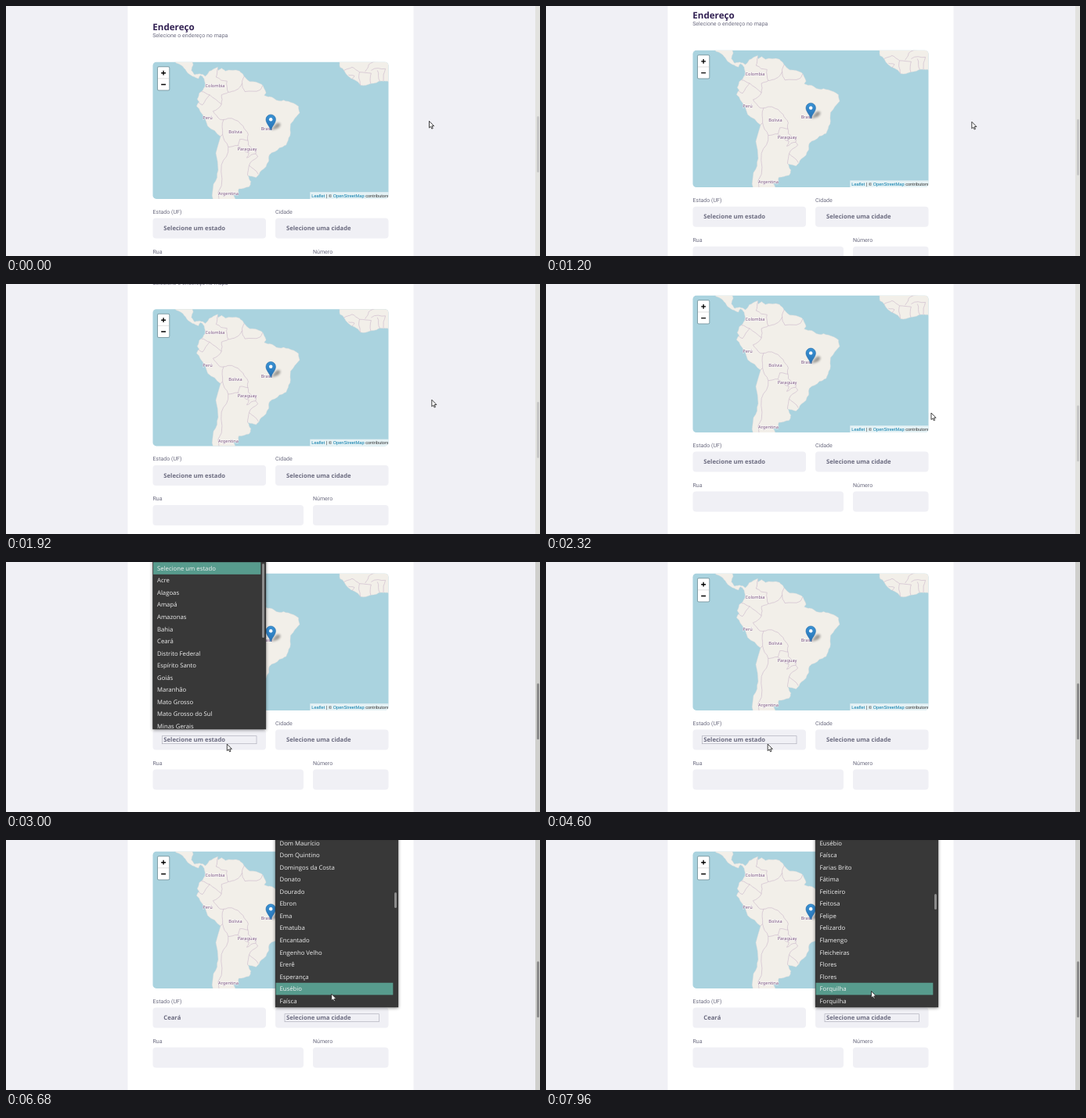
An HTML page that plays this animation: 682x320 px, repeating every 8 s.

```html
<!DOCTYPE html>
<html lang="pt-BR">
<head>
<meta charset="utf-8">
<title>Endereço</title>
<style>
  html, body { margin: 0; width: 100%; height: 100%; overflow: hidden; background: #f0f0f5; }
  svg { display: block; width: 682px; height: 320px; }
  text { white-space: pre; text-rendering: geometricPrecision; }
  .label { font: 7.05px Roboto, sans-serif; fill: #6c6c80; }
  .title { font: 700 11.6px "Open Sans", sans-serif; fill: #322153; }
  .value { font: 700 7.68px "Open Sans", sans-serif; fill: #6c6c80; }
  .field { fill: #f0f0f5; }
  .focus { fill: none; stroke: #a9a9b5; stroke-width: .6; }
  .land { fill: #f2efe9; stroke: #dcd8da; stroke-width: .4; stroke-linejoin: round; }
  .border { fill: none; stroke: #c9b6ca; stroke-width: .6; stroke-linejoin: round; }
  .place { font: 5.6px "Noto Sans", sans-serif; fill: #79527f; text-anchor: middle;
           paint-order: stroke; stroke: #fff; stroke-opacity: .7; stroke-width: 1.2px; }
  .credit { font: 5.66px "Liberation Sans", Arial, sans-serif; fill: #333; }
  .credit .link { fill: #0078a8; }
  .menu text { font: 7.75px "Open Sans", sans-serif; fill: #f0f0f0; }
  .menu .panel { fill: #383838; stroke: #292929; stroke-width: .8; }
  .menu .hit { fill: #579b8d; }
  .menu .thumb { fill: #8c8c8c; }
</style>
</head>
<body>
<svg viewBox="0 0 682 320" xmlns="http://www.w3.org/2000/svg">
  <defs>
    <clipPath id="mapClip"><rect x="187.5" y="71.7" width="301" height="175.2" rx="4.5"/></clipPath>
    <filter id="blur" x="-50%" y="-50%" width="200%" height="200%"><feGaussianBlur stdDeviation="1.4"/></filter>
    <filter id="shade" x="-10%" y="-10%" width="120%" height="120%"><feGaussianBlur stdDeviation="2"/></filter>
    <linearGradient id="pin" x1="0" y1="0" x2="0" y2="1">
      <stop offset="0" stop-color="#3a92d4"/><stop offset="1" stop-color="#2672b5"/>
    </linearGradient>
  </defs>

  <rect width="682" height="320" fill="#f0f0f5"/>
  <rect x="155.5" width="365" height="320" fill="#fff"/>

  <g id="page">
    <text class="title" x="187.3" y="31">Endereço</text>
    <text class="label" x="187.2" y="40">Selecione o endereço no mapa</text>

    <g clip-path="url(#mapClip)">
      <rect x="187" y="71" width="302" height="177" fill="#aad3df"/>
      <g id="map"></g>

      <path d="M338.5 159l6-8q4-3 6 0q0 4-5 6z" opacity=".36" filter="url(#blur)"/>
      <path d="M338.2 159C336.5 153.5 332 150 332 145.2a6.2 6.2 0 0 1 12.4 0C344.4 150 339.9 153.5 338.2 159Z" fill="url(#pin)" stroke="#2468a3" stroke-width=".6"/>
      <circle cx="338.2" cy="145.3" r="2.2" fill="#fff"/>

      <rect x="193" y="77.2" width="16.3" height="31.2" rx="2.2" opacity=".25"/>
      <rect x="194" y="78.2" width="14.3" height="29.2" rx="1.2" fill="#fff"/>
      <path d="M194 92.8h14.3" stroke="#ccc" stroke-width=".6"/>
      <path d="M198.2 85.7h5.8M201.1 82.8v5.8M198.2 100.5h5.8" stroke="#000" stroke-width="1.35"/>

      <rect x="388.3" y="238.2" width="101" height="9" fill="#fff" opacity=".7"/>
      <text class="credit" x="390.3" y="244.5"><tspan class="link">Leaflet</tspan> | © <tspan class="link">OpenStreetMap</tspan> contributors</text>
    </g>

    <g id="fields"></g>
    <text class="value" id="stateValue" x="201.3" y="287.3"></text>
    <text class="value" x="358" y="287.3">Selecione uma cidade</text>
    <rect class="focus" id="focus" y="279.7" width="120.5" height="10"/>
  </g>

  <rect id="track" x="676" width="6" height="320"/>
  <rect id="bar" x="678" width="3" height="72" rx="1.5"/>

  <g class="menu" id="stateMenu"></g>
  <g class="menu" id="cityMenu"></g>

  <path id="cursor" d="M0 0V8.6L2 6.9 3.3 9.8 4.7 9.2 3.4 6.3H6.1Z" fill="#fff" stroke="#222" stroke-width=".85" stroke-linejoin="round"/>
</svg>

<script>
const LOOP = 8000, STEP = 40, ROW = 15.55, MENU_H = 214, NOTCH = 28.5;
const $ = id => document.getElementById(id);

function add(parent, tag, attrs, text) {
  const el = document.createElementNS('http://www.w3.org/2000/svg', tag);
  for (const k in attrs) el.setAttribute(k, attrs[k]);
  if (text) el.textContent = text;
  return parent.appendChild(el);
}

const place = (el, x, y) => el.setAttribute('transform', `translate(${x} ${y})`);
const show = (el, on) => el.setAttribute('visibility', on ? 'visible' : 'hidden');
const phase = (t, from, length) => Math.min(1, Math.max(0, (t - from) / length));
const easeOut = k => 1 - (1 - k) ** 2;
const easeInOut = k => k * k * (3 - 2 * k);
const lastOf = (steps, t) => steps.filter(s => s[0] <= t).pop()[1];

// Web Mercator, centred on the pin in Brasília.
const DEG = 256 * 8 / 360 / 2, HOME = [-47.93, -15.78];
const mercator = lat => Math.asinh(Math.tan(lat * Math.PI / 180)) * 180 / Math.PI;
const project = ([lon, lat]) =>
  [338 + (lon - HOME[0]) * DEG, 159.3 - (mercator(lat) - mercator(HOME[1])) * DEG];

let seed = 11;
const random = () => (seed = seed * 16807 % 2147483647) / 2147483647;

// Midpoint displacement turns a few key points into a natural line.
function roughen(points, depth) {
  if (!depth) return points;
  const out = [points[0]];
  for (let i = 1; i < points.length; i++) {
    const [ax, ay] = points[i - 1], [bx, by] = points[i];
    const k = (random() - .5) * .22;
    out.push([(ax + bx) / 2 + (ay - by) * k, (ay + by) / 2 + (bx - ax) * k], points[i]);
  }
  return roughen(out, depth - 1);
}

function outline(cls, coords, closed) {
  const points = coords.split(',').map(p => project(p.trim().split(' ').map(Number)));
  const d = 'M' + roughen(points, 2).map(p => p.map(v => v.toFixed(1)).join(' ')).join('L');
  add($('map'), 'path', { class: cls, d: d + (closed ? 'Z' : '') });
}

// Key points are "longitude latitude".
outline('land', `-83 16,-83.5 11,-82 9,-79.8 9.5,-77.3 8.4,-75.5 10.6,-71.7 12.4,-71.5 10.9,-70 12,-68.3 10.7,
  -61.9 10.7,-60 8.5,-57.3 6,-52 4.8,-50 1,-50.8 -.2,-48.4 -.8,-44.3 -2.6,-40 -2.9,-35.4 -5.2,-34.9 -8,
  -39 -13,-39.2 -18,-41 -22,-44 -23.1,-48.5 -26,-48.8 -28.6,-52.2 -32.2,-54.5 -34.8,-58.2 -34,-56.8 -36.3,
  -57.7 -38.2,-62.2 -38.9,-62.3 -40.6,-65 -41,-63.7 -42.5,-65.3 -45,-74 -45,-73.6 -37.2,-71.5 -32,-70.4 -18.4,
  -76.2 -13.9,-79.5 -7.5,-81.2 -5,-80 -3,-80.9 -1.8,-80 .8,-77.4 3.8,-77.8 7.3,-79.5 8.8,-80.4 7.3,-83 8.4,
  -85.7 10.5,-88 13.2,-92 16`, true);
outline('land', '-17.5 16,-16.8 12.4,-13.3 8.6,-7.6 4.4,-3 5.1,2 6.3,4.5 6.3,7 4.3,7 16', true);

[
  '-71.5 12,-72.4 8,-67.5 6.2,-67 1.2,-70 0,-70 -4.2,-75.3 0,-79 1.5',
  '-75.3 0,-78.5 -4.5,-80.3 -3.4',
  '-70 -4.2,-73.8 -7.3,-70.6 -11,-69 -11,-69.5 -17.5,-70.4 -18.4',
  '-69 -11,-65.3 -10.5,-60.3 -13.8,-58 -17.5,-58 -22,-54.3 -24,-54.6 -25.6,-58.6 -27.2,-57.7 -25.2,-62.7 -22.2',
  '-58 -20,-61.8 -19.6,-62.7 -22.2,-67 -22.8,-69.5 -17.5',
  '-54.6 -25.6,-53.7 -26.8,-57.6 -30.2,-53.5 -33.6',
  '-57.6 -30.2,-58.3 -34',
  '-67 -22.8,-70 -30,-71.5 -40,-71.8 -45',
  '-67 1.2,-63.5 2.2,-60.7 5.2,-59.8 8.3',
  '-60.7 5.2,-59.5 1.5,-52.6 2.3,-51.6 4.2',
  '-15 11,-11.4 12.4,-8 10.2,-8.3 7.6,-7.6 4.4',
  '-13 9,-10.3 8.5,-11.4 7',
  '-8 10.2,-2.8 9.7,-3 5.1',
  '-5.5 10.4,-4 13.4,0 15',
  '-2.8 11,3.6 11.7,2.7 6.3',
  '0 11,1.2 6.1',
].forEach(line => outline('border', line));

for (const [name, x, y] of [['Colombia', 267, 103.5], ['Perú', 257.5, 145], ['Bolivia', 293, 163],
  ['Brasil', 333, 159.3], ['Paraguay', 308, 184.8], ['Argentina', 284, 242]])
  add($('map'), 'text', { class: 'place', x, y }, name);

for (const [name, x, y, width] of [['Estado (UF)', 187.5, 265.5, 144.5], ['Cidade', 344, 265.5, 144.5],
  ['Rua', 187.5, 316.5, 192.5], ['Número', 392, 316.5, 96.5]]) {
  add($('fields'), 'text', { class: 'label', x, y }, name);
  add($('fields'), 'rect', { class: 'field', x, y: y + 6, width, height: 26, rx: 4 });
}

function menu(id, x, width, thumbH, names) {
  const root = $(id), clip = id + 'Clip';
  add(add(root, 'clipPath', { id: clip }), 'rect', { x, y: 0, width, height: MENU_H - .5 });
  add(root, 'rect', { x, y: -8, width, height: MENU_H + 9, opacity: .45, filter: 'url(#shade)' });
  add(root, 'rect', { class: 'panel', x: x + .3, y: -.2, width: width - .6, height: MENU_H });
  const list = add(add(root, 'g', { 'clip-path': `url(#${clip})` }), 'g', {});
  const hit = add(list, 'rect', { class: 'hit', x: x + .6, width: width - 7.3, height: ROW });
  names.forEach((name, i) => add(list, 'text', { x: x + 5.5, y: i * ROW + 10.8 }, name));
  const thumb = add(root, 'rect', { class: 'thumb', x: x + width - 5, width: 3, height: thumbH, rx: 1.5 });
  return (open, row, scroll, thumbY) => {
    show(root, open);
    show(hit, open && row >= 0);
    hit.setAttribute('y', row * ROW + .3);
    thumb.setAttribute('y', thumbY);
    place(list, 0, -scroll);
  };
}

const stateMenu = menu('stateMenu', 187.5, 144.5, 95, ['Selecione um estado', 'Acre', 'Alagoas', 'Amapá',
  'Amazonas', 'Bahia', 'Ceará', 'Distrito Federal', 'Espírito Santo', 'Goiás', 'Maranhão', 'Mato Grosso',
  'Mato Grosso do Sul', 'Minas Gerais']);

// Only the stretches of the long list that come into view.
const cities = ['Selecione uma cidade', 'Abaiara', 'Abílio Martins', 'Acarape',
  'Acaraú', 'Acopiara', 'Açude dos Pinheiros', 'Açudinho', 'Açudinho dos Costas', 'Adrianópolis', 'Água Branca',
  'Agua Fria', 'Água Verde', 'Aguaí',
  'Dom Maurício', 'Dom Quintino', 'Domingos da Costa', 'Donato', 'Dourado', 'Ebron', 'Ema', 'Ematuba',
  'Encantado', 'Engenho Velho', 'Ererê', 'Esperança', 'Eusébio', 'Faísca', 'Farias Brito', 'Fátima',
  'Feiticeiro', 'Feitosa', 'Felipe', 'Felizardo', 'Flamengo', 'Fleicheiras', 'Flores', 'Flores',
  'Forquilha', 'Forquilha'];
const cityMenu = menu('cityMenu', 344, 157, 20, cities);
const firstF = cities.indexOf('Faísca');

// Each move is [start, end, x, y].
const moves = [[0, 120, 543.8, 148.2], [2160, 2720, 282.3, 233], [4040, 4200, 283.2, 233],
  [4600, 5160, 417.5, 225.2], [6320, 6680, 415.7, 197], [7880, 7960, 415.5, 193.5]];
function pointer(t) {
  let x = 540.5, y = 147.3;
  for (const [from, to, tx, ty] of moves) {
    const k = easeInOut(phase(t, from, to - from));
    x += (tx - x) * k;
    y += (ty - y) * k;
  }
  return [x, y];
}

const pageScroll = t => NOTCH * (easeOut(phase(t, 1160, 130)) + easeOut(phase(t, 1800, 555)));

function drawCities(t, pointerY) {
  const notches = [6840, 6960, 7240, 7440].filter(at => t >= at).length;
  const jumped = t >= 5920;
  // Typing "f" puts the first match on the bottom line; each notch turns three rows.
  const scroll = jumped ? (firstF - 13 + 3 * notches) * ROW + 4.15 : 0;
  let row = lastOf([[0, -1], [5680, 0], [5920, firstF]], t);
  if (jumped && pointerY < MENU_H - ROW) row = Math.floor((pointerY + scroll) / ROW);
  if (notches && t < 7920) row = -1;
  cityMenu(t >= 5640, row, scroll, jumped ? 67 + notches / 2 : 2);
}

function draw(t) {
  const y = pageScroll(t), used = t >= 2920, at = pointer(t);
  place($('page'), 0, -y);
  $('bar').setAttribute('y', 141 + y * .25);
  $('bar').setAttribute('fill', used ? '#8b8b8b' : '#c6c6c6');
  $('track').setAttribute('fill', used ? '#cfcfcc' : '#e2e2df');

  $('stateValue').textContent = t < 4640 ? 'Selecione um estado' : 'Ceará';
  show($('focus'), used);
  $('focus').setAttribute('x', t < 5360 ? 199.5 : 356);

  stateMenu(t >= 2960 && t < 4600, lastOf([[0, -1], [3000, 0], [3560, 6]], t), 0, 2);
  drawCities(t, at[1]);
  place($('cursor'), ...at);
}

const start = performance.now();
function frame() {
  const t = (performance.now() - start) % LOOP;
  draw(Math.floor(t / STEP) * STEP);
  requestAnimationFrame(frame);
}
frame();
</script>
</body>
</html>
```
